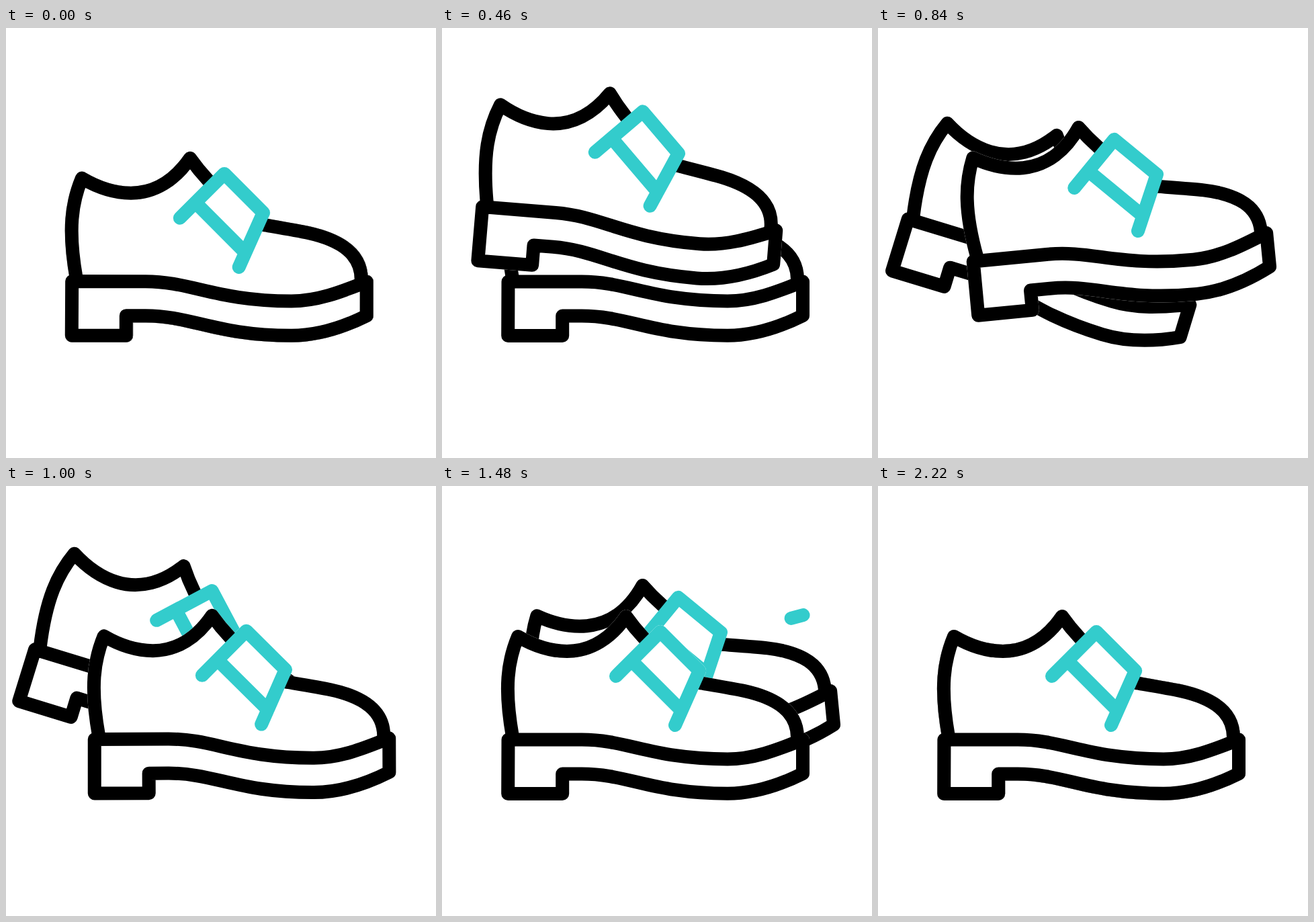
An HTML page that plays this animation: 640 px wide and 640 px high, repeating every 2400 ms.

```html
<!DOCTYPE html>
<html lang="en">
<head>
<meta charset="utf-8">
<title>Walking shoes</title>
<style>
  html, body { margin: 0; width: 100%; height: 100%; overflow: hidden; background: #fff; }
  svg { display: block; width: 100vw; height: 100vh; }
  path { fill: none; stroke: currentColor; stroke-width: 20; stroke-linecap: round; stroke-linejoin: round; }
  .fill { fill: #fff; stroke: none; }
  .sole { fill: #fff; }
  .gap { color: #fff; }
  .ink { color: #000; }
  .accent { color: #3cc; }
</style>
</head>
<body>
<svg viewBox="0 0 640 640">
  <defs>
    <g id="body">
      <path d="M105 373C92 300 98 260 113 224C137 238 163 246 186 246C222 246 252 226 274 194Q286 211 301 227"/>
      <path d="M383 293C418 299 436 302 450 305C500 316 529 337 529 374"/>
      <path class="sole" d="M98.500 377.500H208C277 377.500 313 406.500 425 406.500C467 406.500 505 390 537 377.500V428C505 444 465 457.800 425 457.800C313 457.800 277 428.500 208 428.500H179.200V458H98.200Z"/>
    </g>
    <path id="strap" d="M259 283L325 217L383 275L347 356M282 260L356.500 334.500"/>
    <g id="shoe">
      <path class="fill" d="M105 376C92 300 98 260 113 224C137 238 163 246 186 246C222 246 252 226 274 194L302 228L325 217L383 275L386 294C418 299 436 302 450 305C500 316 529 337 529 376L430 406L208 377Z"/>
      <!-- White underlay leaves a hairline between overlapping shoes -->
      <g class="gap"><use href="#body"/><use href="#strap"/></g>
      <use class="ink" href="#body"/>
      <use class="accent" href="#strap"/>
    </g>
  </defs>
  <use id="back" href="#shoe"/>
  <use id="front" href="#shoe"/>
  <g id="rays" class="accent"></g>
</svg>
<script>
const LOOP = 2400, BACK_DELAY = 640;

// One stride: time, x, y, angle
const STRIDE = [
  [0, 0, 0, 0],
  [200, -46.5, -26.1, 16.8],
  [260, -52, -41, 21.2],
  [290, -52.5, -48, 22],
  [440, -38, -88, 7],
  [560, -7.8, -115.4, -6.9],
  [640, 18.8, -122.1, -12.8],
  [740, 37, -88, -9.4],
  [840, 36.6, -51.5, -5.6],
  [980, 36, -2, -0.3],
  [1080, 0, 0, 0]
];

const clamp = v => Math.min(1, Math.max(0, v));
const easeOut = v => 1 - (1 - v) ** 3;
const easeInOut = v => v * v * (3 - 2 * v);

function slope(i, c) {
  const a = STRIDE[i], b = STRIDE[i + 1];
  return (b[c] - a[c]) / (b[0] - a[0]);
}

// Tangent that never overshoots the keys
function tangent(i, c) {
  if (i === 0) return slope(0, c);
  if (i === STRIDE.length - 1) return slope(i - 1, c);
  const p = slope(i - 1, c), n = slope(i, c);
  return p * n > 0 ? 2 * p * n / (p + n) : 0;
}

function pose(t) {
  const last = STRIDE.length - 1;
  if (t <= 0 || t >= STRIDE[last][0]) return [0, 0, 0];
  let i = 0;
  while (t >= STRIDE[i + 1][0]) i++;
  const a = STRIDE[i], b = STRIDE[i + 1], h = b[0] - a[0], u = (t - a[0]) / h;
  return [1, 2, 3].map(c =>
    a[c] + (b[c] - a[c]) * easeInOut(u)
      + h * u * (1 - u) * ((1 - u) * tangent(i, c) - u * tangent(i + 1, c)));
}

function place(el, t) {
  const [x, y, r] = pose(t);
  el.setAttribute("transform", `translate(${x} ${y}) rotate(${r} 320 320)`);
}

const HUB = [396, 230], INNER = 128, OUTER = 147.5;
const back = document.getElementById("back");
const front = document.getElementById("front");
const rays = [15, 45, 75].map((deg, i) => {
  const el = document.createElementNS("http://www.w3.org/2000/svg", "path");
  document.getElementById("rays").append(el);
  return { el, angle: deg * Math.PI / 180, start: 1380 + i * 160 };
});

function drawRay({ el, angle, start }, t) {
  const local = t - start;
  const head = easeOut(clamp(local / 160));
  const tail = easeInOut(clamp((local - 260) / 260));
  const at = p => {
    const r = INNER + (OUTER - INNER) * p;
    return `${HUB[0] + r * Math.cos(angle)} ${HUB[1] - r * Math.sin(angle)}`;
  };
  el.setAttribute("d", head > tail ? `M${at(tail)}L${at(head)}` : "");
}

function draw(t) {
  place(front, t);
  place(back, t - BACK_DELAY);
  rays.forEach(ray => drawRay(ray, t));
}

const begin = performance.now();
function tick(now) {
  draw(Math.max(0, now - begin) % LOOP);
  requestAnimationFrame(tick);
}
draw(0);
requestAnimationFrame(tick);
</script>
</body>
</html>
```
